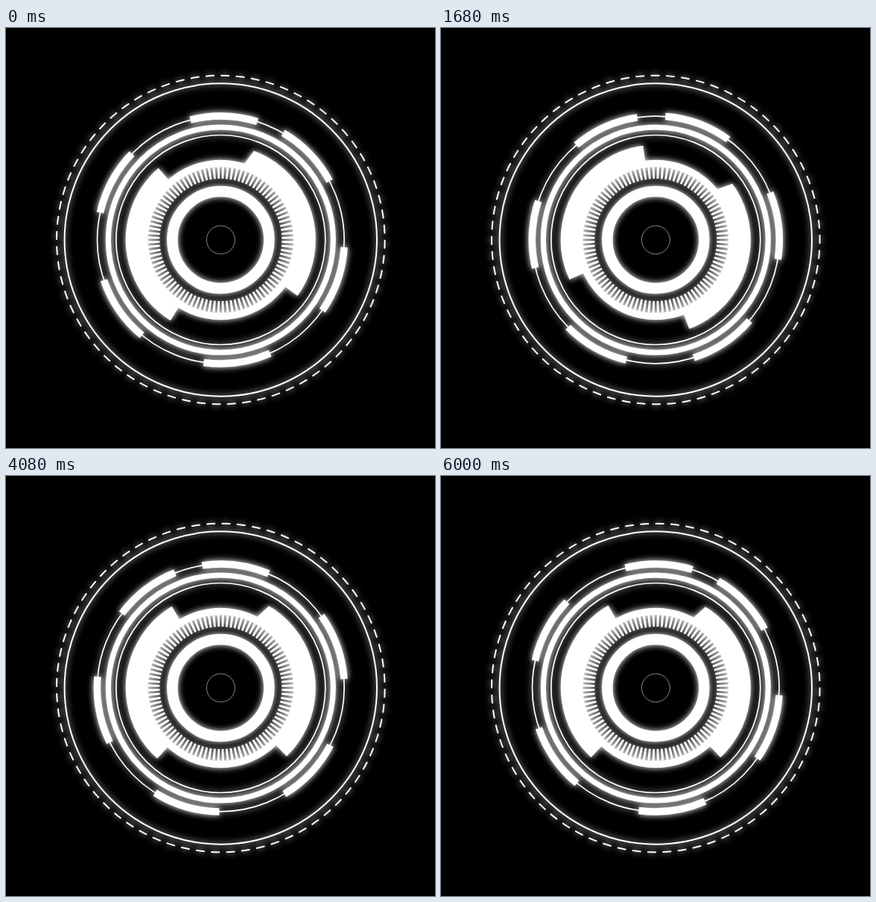
Recreate the animation shown at these times as an HTML page. Size 576x563 px, loop 6.03 s.

```html
<!DOCTYPE html>
<html lang="en">
<head>
<meta charset="utf-8">
<title>Rotating dial</title>
<style>
  html, body { margin: 0; width: 100%; height: 100%; overflow: hidden; background: #000; }
  svg { display: block; width: 576px; height: 563px; }
  circle { fill: none; stroke: #fff; }
  .glow { filter: drop-shadow(0 0 4px #fff); }
  .hub { stroke: #888; }
</style>
</head>
<body>
<svg viewBox="0 0 576 563">
  <g transform="translate(288.3 284)">
    <g class="glow">
      <circle id="dashes" r="220.3" stroke-width="2" pathLength="680" stroke-dasharray="5.8 4.2"/>
      <circle r="209.7" stroke-width="2"/>
      <circle r="165.8" stroke-width="1.7"/>
      <circle id="arcs" r="166" stroke-width="9.5" pathLength="360" stroke-dasharray="31.4 31.7"/>
      <circle r="151" stroke-width="7.2"/>
      <circle r="140.5" stroke-width="1.7"/>
      <circle id="wedges" r="117" stroke-width="21" pathLength="360" stroke-dasharray="107 86 107 60"/>
      <circle r="102.5" stroke-width="9.5"/>
      <circle r="90" stroke-width="16" pathLength="192" stroke-dasharray="1 1" stroke-dashoffset="-.5"/>
      <circle r="65" stroke-width="14.5"/>
    </g>
    <circle class="hub" r="19"/>
  </g>
</svg>
<script>
const LOOP = 6030, STEP = 30, DASHES = 68;
const times = [0, 990, 2370, 3210, 4080, 4650, 6000];
const arcAngles = [30.3, 1.4, 7.6, 4.1, -8.6, -14.5, 30.3];
const wedgeAngles = [19, 66, 22, -41.3, 29, 99.7, 30];

// Slope at a key: zero at turning points, otherwise the mean rate across it.
function slope(values, i) {
  if (i === 0 || i === times.length - 1) return 0;
  const before = values[i] - values[i - 1], after = values[i + 1] - values[i];
  return before * after <= 0 ? 0 : (before + after) / (times[i + 1] - times[i - 1]);
}

// Cubic Hermite curve through the key angles.
function angleAt(values, t) {
  let i = 0;
  while (i < times.length - 2 && t >= times[i + 1]) i++;
  const span = times[i + 1] - times[i], u = (t - times[i]) / span;
  const ease = u * u * (3 - 2 * u);
  return values[i] + (values[i + 1] - values[i]) * ease
    + span * u * (1 - u) * ((1 - u) * slope(values, i) - u * slope(values, i + 1));
}

function turn(id, angle) {
  document.getElementById(id).setAttribute("transform", `rotate(${angle - 90})`);
}

function draw(now) {
  const t = Math.floor(now % LOOP / STEP) * STEP;
  turn("dashes", t / LOOP * 6 * 360 / DASHES);
  turn("arcs", angleAt(arcAngles, t));
  turn("wedges", angleAt(wedgeAngles, t));
  requestAnimationFrame(() => draw(performance.now() - start));
}

const start = performance.now();
draw(0);
</script>
</body>
</html>
```
